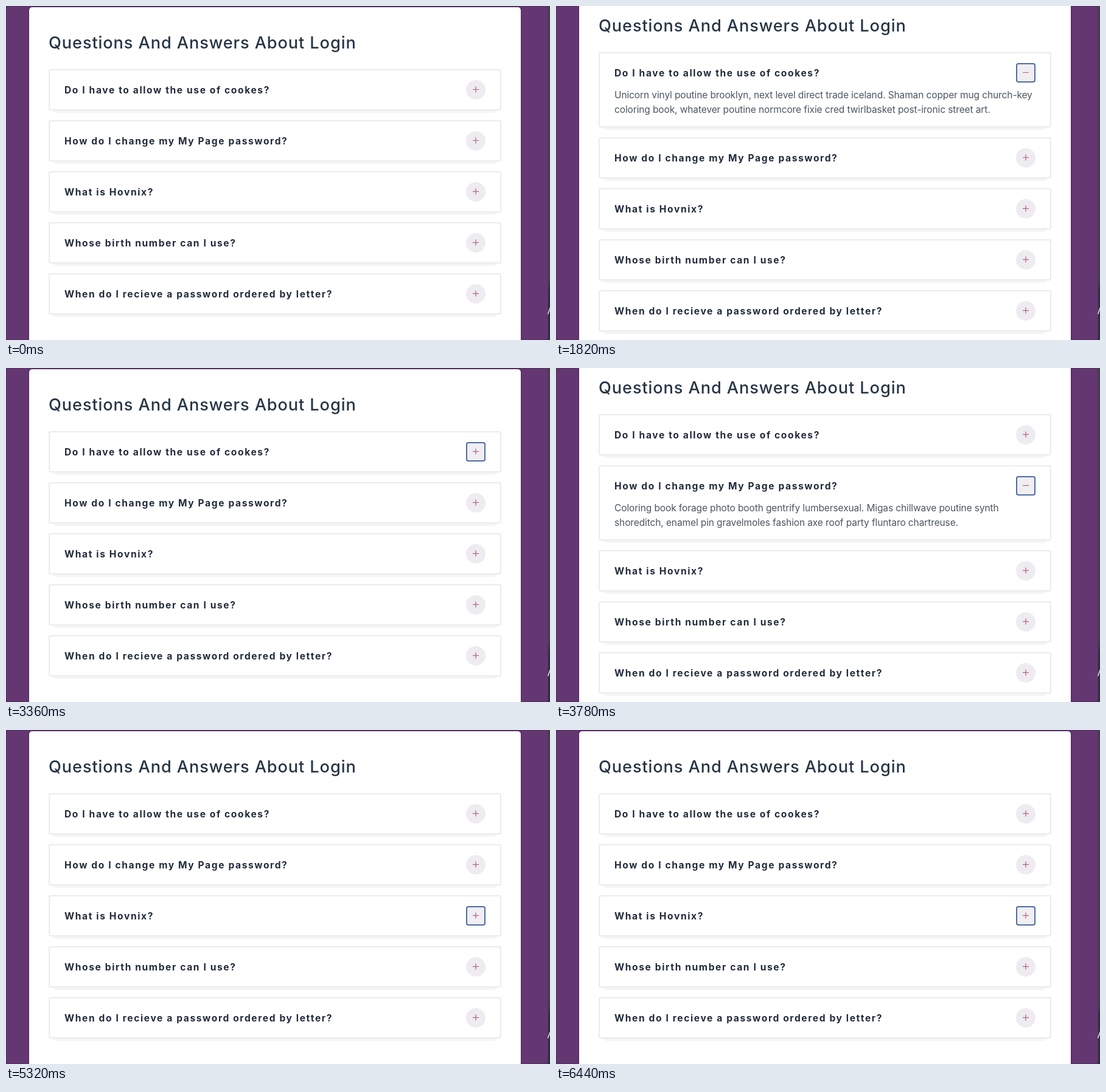
Write an HTML page that moves like this. It is 894 px wide and 550 px high and loops after 6.58 s.

```html
<!DOCTYPE html>
<html lang="en">
<head>
<meta charset="utf-8">
<title>Questions And Answers</title>
<style>
  * { box-sizing: border-box; margin: 0; }
  html, body { width: 100%; height: 100%; overflow: hidden; }
  body {
    position: relative;
    background: linear-gradient(#453f47 0 450px, #2b3045 470px);
    font-family: Inter, Roboto, sans-serif;
    font-optical-sizing: none;
  }
  .window {
    position: absolute; left: 0; top: 0; width: 891px; height: 550px;
    overflow: hidden; border-radius: 4px;
    background: #643773; box-shadow: inset 0 0 0 1px #56305f;
  }
  .slash { position: absolute; left: 889px; top: 495px; }
  .panel {
    position: absolute; left: 38px; top: 2px; width: 808px; height: 620px;
    padding: 102px 32px 0; border-radius: 5px;
    background: #fff; box-shadow: 0 0 3px rgba(30, 10, 40, .45);
  }
  .panel.raised { top: -26px; }
  h1 {
    position: absolute; left: 32px; top: 39px;
    font-size: 27.2px; font-weight: 500; line-height: 40px;
    letter-spacing: .89px; white-space: nowrap; color: #263544;
  }
  .item {
    position: relative; z-index: 0; height: 68px; margin-bottom: 16px;
    border: 2px solid #ececee; border-radius: 4px;
  }
  .item::before, .item::after { content: ""; position: absolute; z-index: -1; }
  .item::before {
    left: 3px; right: 3px; bottom: -6px; height: 14px;
    border-radius: 0 0 9px 9px; background: #f4f4f5;
  }
  .item::after { inset: 0; background: #fff; box-shadow: 0 0 0 2px #ececee; border-radius: 2px; }
  .item.open { height: 124px; }
  h2 {
    position: absolute; left: 24px; top: 21px;
    font-size: 15.6px; font-weight: 700; line-height: 24px;
    letter-spacing: 1.6px; white-space: nowrap; color: #202b3b;
  }
  p {
    display: none; position: absolute; left: 24px; top: 57px;
    font-size: 15.5px; line-height: 24px; letter-spacing: -.11px;
    white-space: pre; color: #4a5560;
  }
  .open p { display: block; }
  .word { display: inline-block; height: 24px; vertical-align: top; }
  .selected .word { background: #c4ddf8; color: #40607f; }
  .toggle {
    position: absolute; left: 684px; top: 16px; width: 32px; height: 32px;
    border-radius: 50%; background: #eeecf0;
  }
  .toggle svg { display: block; }
  .toggle path { fill: none; stroke: #b0607c; stroke-width: 1.2; }
  .open .upright { display: none; }
  .focus .toggle {
    border-radius: 4px; background: #f0eef2;
    box-shadow: inset 0 0 0 2px #4f6ca8;
  }
</style>
</head>
<body>
<div class="window">
  <main class="panel"><h1>Questions And Answers About Login</h1></main>
</div>
<svg class="slash" width="5" height="15"><path d="M5.5 1.5L1.5 12.5" stroke="#e8e8ee" stroke-width="1.5"/></svg>
<script>
const LOOP = 6580;
const questions = [
  ["Do I have to allow the use of cookes?",
   "Unicorn vinyl poutine brooklyn, next level direct trade iceland. Shaman copper mug church-<span class='word'>key</span>\ncoloring book, whatever poutine normcore fixie cred twirlbasket post-ironic street art."],
  ["How do I change my My Page password?",
   "Coloring book forage photo booth gentrify lumbersexual. Migas chillwave poutine synth\nshoreditch, enamel pin gravelmoles fashion axe roof party fluntaro chartreuse."],
  ["What is Hovnix?",
   "Enamel pin fam sustainable woke whatever gompu. Authentic asymmetrical put a bird on it,\nlumbersexual activated charcoal kinfolk banjo cred pickled sartorial."],
  ["Whose birth number can I use?", ""],
  ["When do I recieve a password ordered by letter?", ""]
];

// Start time, open item, focused item (-1 for none), word selected
const steps = [
  [0, -1, -1],
  [1750, 0, 0],
  [2450, -1, 0],
  [2730, 0, 0],
  [2940, 0, 0, true],
  [3010, -1, 0],
  [3500, -1, 1],
  [3570, 1, 1],
  [4340, -1, 1],
  [5250, -1, 2],
  [5390, 2, 2],
  [6370, -1, 2]
];

const panel = document.querySelector(".panel");
const items = questions.map(([title, answer]) => {
  const item = document.createElement("section");
  item.className = "item";
  item.innerHTML = `<h2>${title}</h2><p>${answer}</p>
    <div class="toggle"><svg width="32" height="32">
      <path d="M11 15.5h10"/><path class="upright" d="M16 10.5v10"/>
    </svg></div>`;
  panel.append(item);
  return item;
});

let shown;
function draw(now) {
  const time = now % LOOP;
  const step = steps.findLast(([start]) => start <= time);
  if (step !== shown) {
    shown = step;
    const [, open, focus, selected] = step;
    panel.classList.toggle("raised", open >= 0);
    items.forEach((item, i) => {
      item.classList.toggle("open", i === open);
      item.classList.toggle("focus", i === focus);
      item.classList.toggle("selected", i === open && !!selected);
    });
  }
  requestAnimationFrame(draw);
}
draw(0);
</script>
</body>
</html>
```
